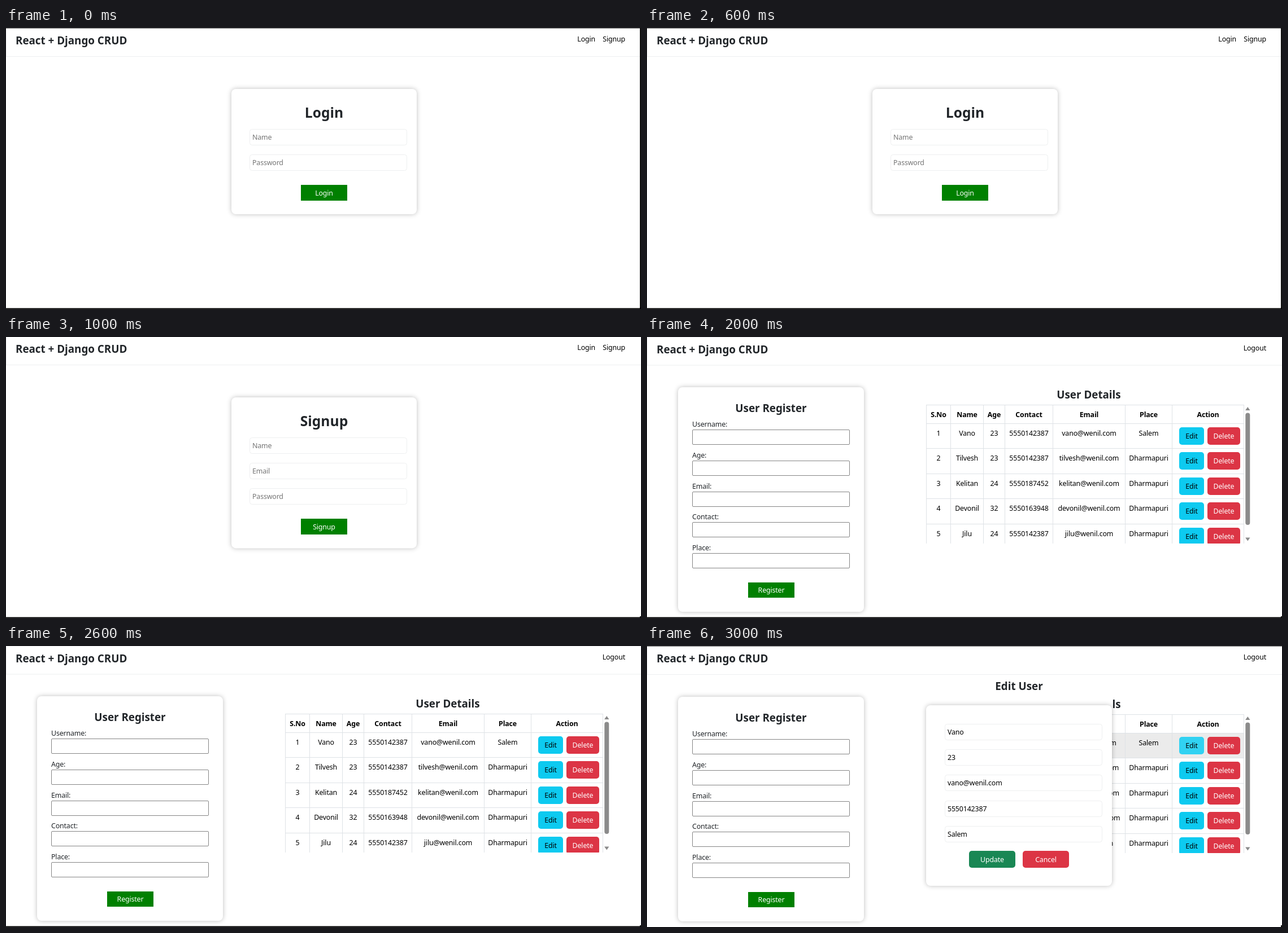
Recreate the animation shown at these times as an HTML page with a canvas. Size 1124 by 498 pixels, loop 4000 ms.

```html
<!DOCTYPE html>
<html lang="en">
<head>
<meta charset="utf-8">
<title>React + Django CRUD</title>
<style>
  html, body { margin: 0; width: 100%; height: 100%; overflow: hidden; background: #fff; }
  canvas { display: block; }
</style>
</head>
<body>
<canvas id="stage" width="1124" height="498"></canvas>
<script>
const ctx = document.getElementById('stage').getContext('2d');
const FAMILY = '"Noto Sans", "Open Sans", sans-serif';
const INK = '#212529', GREEN = '#008000', RED = '#dc3545', CYAN = '#0dcaf0';
const SCENE_MS = 1000;

const people = [
  ['Vano', 23, '5550142387', 'Salem'],
  ['Tilvesh', 23, '5550142387', 'Dharmapuri'],
  ['Kelitan', 24, '5550187452', 'Dharmapuri'],
  ['Devonil', 32, '5550163948', 'Dharmapuri'],
  ['Jilu', 24, '5550142387', 'Dharmapuri']
].map(([name, age, contact, place]) =>
  ({ name, age, contact, place, email: name.toLowerCase() + '@wenil.com' }));

const columns = [494, 537, 595, 633, 718, 846, 929, 1056];
const headers = ['S.No', 'Name', 'Age', 'Contact', 'Email', 'Place', 'Action'];

function text(str, x, y, { size = 12.4, weight = 400, color = '#000', align = 'left' } = {}) {
  ctx.font = `${weight} ${size}px ${FAMILY}`;
  ctx.letterSpacing = size < 14 ? '-0.15px' : '0px';
  ctx.textAlign = align;
  ctx.fillStyle = color;
  ctx.fillText(str, x, y);
}

function heading(str, x, y, size = 18.8, align = 'center') {
  text(str, x, y, { size, weight: 600, color: INK, align });
}

function rect(x, y, w, h, color) {
  ctx.fillStyle = color;
  ctx.fillRect(x, y, w, h);
}

function rounded(x, y, w, h, r) {
  ctx.beginPath();
  ctx.roundRect(x, y, w, h, r);
}

function card(x, y, w, h) {
  ctx.save();
  ctx.shadowColor = 'rgba(0,0,0,0.26)';
  ctx.shadowBlur = 8;
  ctx.fillStyle = '#fff';
  rounded(x, y, w, h, 8);
  ctx.fill();
  ctx.restore();
}

function input(x, y, h, r, border) {
  ctx.strokeStyle = border;
  ctx.lineWidth = 1;
  rounded(x + 0.5, y + 0.5, 278, h, r);
  ctx.stroke();
}

function softInput(x, y, value, color) {
  input(x, y, 28, 4, '#eeeff0');
  text(value, x + 5, y + 19, { color });
}

function button(label, x, y, w, h, fill, r = 0, color = '#fff') {
  ctx.fillStyle = fill;
  rounded(x, y, w, h, r);
  ctx.fill();
  text(label, x + w / 2, y + h / 2 + 4.5, { color, align: 'center' });
}

function nav(links) {
  rect(0, 0, 1, 50, '#eeeff0');
  rect(0, 49, 1124, 1, '#eeeff0');
  heading('React + Django CRUD', 17, 28, 18.8, 'left');
  links.forEach(([label, right]) => text(label, right, 23, { align: 'right' }));
}

const guestLinks = [['Login', 1043], ['Signup', 1096]];
const userLinks = [['Logout', 1096]];

function authForm(title, fields) {
  const end = 178 + fields.length * 45.3;
  card(399, 107, 328, end + 60.5 - 107);
  heading(title, 563, 158, 24.6);
  fields.forEach((f, i) => softInput(431, Math.round(178 + i * 45.2), f, '#757575'));
  button(title, 522, Math.round(end + 8), 82, 28, GREEN);
}

function registerForm() {
  card(55, 89, 329, 398);
  heading('User Register', 219.5, 133);
  ['Username:', 'Age:', 'Email:', 'Contact:', 'Place:'].forEach((label, i) => {
    const y = Math.round(164 + i * 54.75);
    text(label, 80, y - 5, { color: INK });
    input(80, y, 26, 1.5, '#858585');
  });
  button('Register', 179, 435, 82, 27, GREEN);
}

function arrow(y, dir) {
  ctx.fillStyle = '#8b8b8b';
  ctx.beginPath();
  ctx.moveTo(1063.3, y - 3 * dir);
  ctx.lineTo(1067.5, y + 3 * dir);
  ctx.lineTo(1059.1, y + 3 * dir);
  ctx.fill();
}

function userTable(hovered) {
  const mid = c => (columns[c] + columns[c + 1] + 1) / 2;
  heading('User Details', 782, 109);
  ctx.save();
  ctx.beginPath();
  ctx.rect(494, 120, 564, 246);
  ctx.clip();
  if (hovered) rect(494, 154, 563, 44, '#ebebeb');
  headers.forEach((h, c) => text(h, mid(c), 142, { weight: 700, align: 'center' }));
  people.forEach((p, i) => {
    const top = Math.round(153 + i * 44.4);
    [i + 1, p.name, p.age, p.contact, p.email, p.place].forEach((v, c) =>
      text(v, mid(c), top + 22, { align: 'center' }));
    button('Edit', 942, top + 7, 44, 31, hovered && !i ? '#31d2f2' : CYAN, 5, '#000');
    button('Delete', 992, top + 7, 58, 31, RED, 5);
    rect(494, top, 563, 1, '#dee2e6');
  });
  rect(494, 120, 563, 1, '#dee2e6');
  columns.forEach(x => rect(x, 120, 1, 246, '#dee2e6'));
  ctx.restore();
  arrow(127, 1);
  arrow(358.5, -1);
  ctx.fillStyle = '#8b8b8b';
  rounded(1059.3, 134.5, 8, 198.5, 4);
  ctx.fill();
}

function editDialog({ name, age, email, contact, place }) {
  rect(494, 52, 329, 60, '#fff');
  heading('Edit User', 658.5, 77);
  card(494, 104, 329, 320);
  [name, age, email, contact, place].forEach((v, i) =>
    softInput(527, Math.round(136.5 + i * 45.4), v, '#000'));
  button('Update', 570, 362, 82, 30, '#198754', 5);
  button('Cancel', 665, 362, 82, 30, RED, 5);
}

// Each scene: vertical offset of the navbar, of the page, and its content.
const scenes = [
  { navY: 1, y: 1, draw() {
    authForm('Login', ['Name', 'Password']);
  } },
  { navY: 0, y: 0, draw() {
    authForm('Signup', ['Name', 'Email', 'Password']);
  } },
  { navY: 0.5, y: 0, user: true, draw() {
    registerForm();
    userTable(false);
  } },
  { navY: 1, y: 1, user: true, draw() {
    registerForm();
    userTable(true);
    editDialog(people[0]);
  } }
];

function at(dy, draw) {
  ctx.save();
  ctx.translate(0, dy);
  draw();
  ctx.restore();
}

// Dark window edges caught around the page.
function edges(i) {
  if (i === 0 || i === 3) rect(0, 0, 1124, 1, '#777');
  if (i === 2) rect(0, 0, 1124, 1, '#eeeff0');
  if (i === 0) rect(1122, 0, 2, 498, '#111');
  if (i < 3) rect(0, 496.5, 1124, 1.5, '#000');
  rect(1122, 495, 2, 3, '#000');
}

function render(now) {
  const i = Math.floor(now / SCENE_MS) % scenes.length;
  const scene = scenes[i];
  rect(0, 0, 1124, 498, '#fff');
  at(scene.navY, () => nav(scene.user ? userLinks : guestLinks));
  at(scene.y, scene.draw);
  edges(i);
}

const start = performance.now();
function tick() {
  render(performance.now() - start);
  requestAnimationFrame(tick);
}
tick();
</script>
</body>
</html>
```
